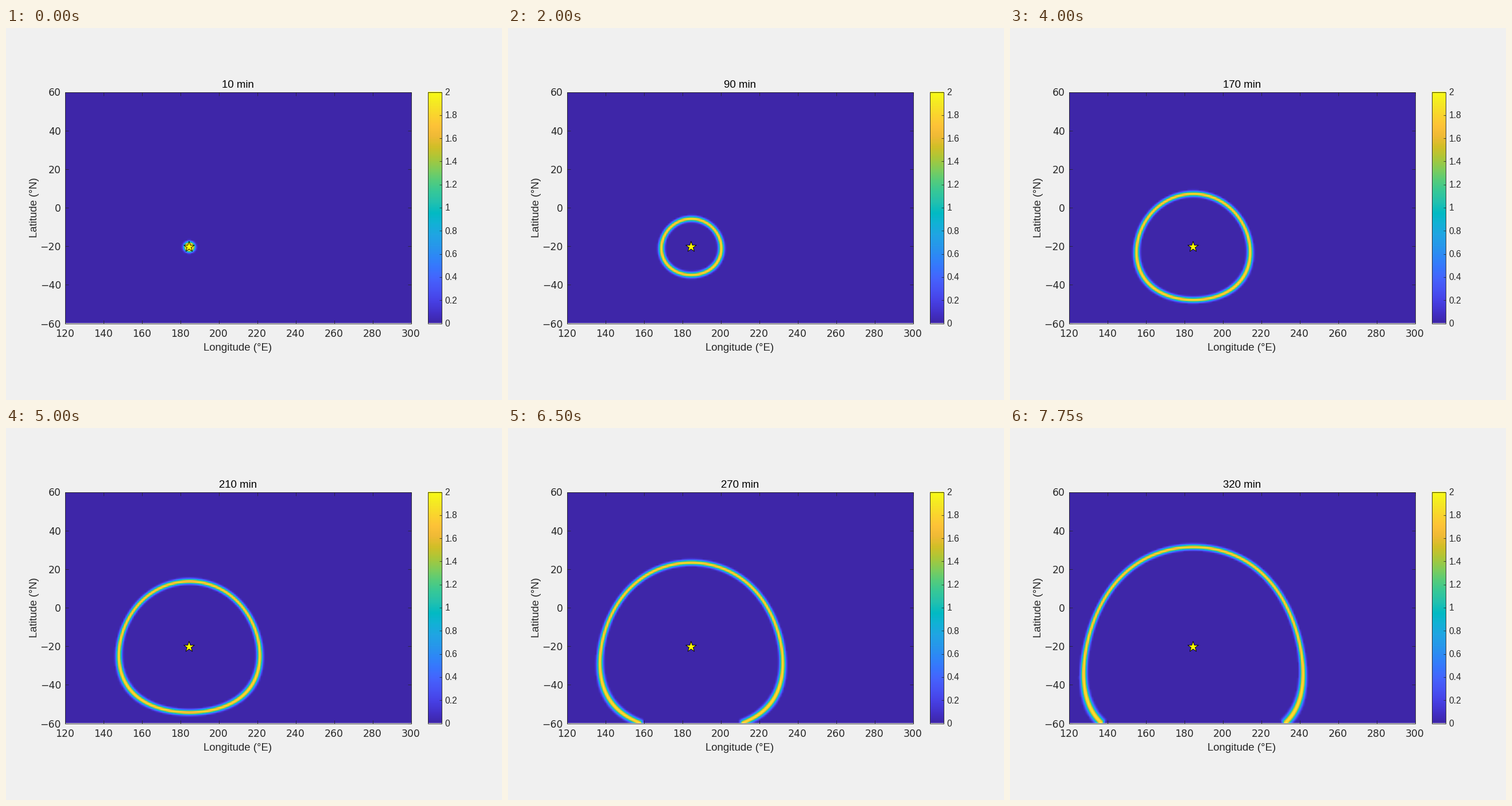
Recreate the animation shown at these times as a matplotlib script. Size 864 by 648 pixels, loop 8000 ms.

```python
import numpy as np
import matplotlib.pyplot as plt
from matplotlib.animation import FuncAnimation
from matplotlib.colors import LinearSegmentedColormap
from matplotlib.patches import Polygon, Rectangle

W, H, DPI = 864, 648, 72          # at 72 dpi one point is one pixel
FRAMES, INTERVAL = 32, 250
LEFT, RIGHT, TOP, BOTTOM = 102.5, 705.5, 111.5, 514.5
BAR_LEFT, BAR_RIGHT = 734.5, 758.5
INK = "#262626"

LON0, LAT0 = 184.61, -20.5
DEG_PER_MIN = 0.300 * 60 / 111.195  # 300 m/s along a great circle
SIGMA, REACH, PEAK = 0.8, 2.1, 2.0
EDGE = -60

SHADES = ("3E26A8 4332CB 4741E5 4852F4 4563FD 3875FE 2E87F7 2797EB 20A5E3 "
          "12B1D6 02BAC3 24C1AE 37C897 57CC7A 81CC59 ABC739 D1BF27 F0BA36 "
          "FEC338 FAD62D F5E924 F9FB15").split()
CMAP = LinearSegmentedColormap.from_list("wave", ["#" + s for s in SHADES])

lon, lat = np.meshgrid(np.arange(120, 301), np.arange(60, -61, -1))
dlon = np.abs(lon - LON0)
SIN0, COS0 = np.sin(np.radians(LAT0)), np.cos(np.radians(LAT0))
phi = np.radians(lat)
dist = np.degrees(np.arccos(np.clip(
    SIN0 * np.sin(phi) + COS0 * np.cos(phi) * np.cos(np.radians(dlon)), -1, 1)))


def end_fade(radius):
    """Cut the front square to its path where it leaves the map."""
    if radius <= LAT0 - EDGE:
        return 1.0
    r, p = np.radians(radius), np.radians(EDGE)
    cos_d = (np.cos(r) - SIN0 * np.sin(p)) / (COS0 * np.cos(p))
    d = np.arccos(cos_d)
    gx = np.cos(p) * COS0 * np.sin(d)
    gy = np.cos(p) * SIN0 - np.sin(p) * COS0 * cos_d
    past = (gy * (np.degrees(d) - dlon) - gx * (lat - EDGE)) / np.hypot(gx, gy)
    # only the southern end is cut, not the rest of the ring
    past = np.where(lat < EDGE + 6, np.maximum(past, 0), 0)
    return np.exp(-0.5 * (past / 0.5) ** 2)


def wave(minutes):
    radius = minutes * DEG_PER_MIN
    off = dist - radius
    height = PEAK * np.exp(-0.5 * (off / SIGMA) ** 2)
    return np.where(np.abs(off) < REACH, height, 0) * end_fade(radius)


def px(lon_deg):
    return LEFT + (lon_deg - 120) / 180 * (RIGHT - LEFT)


def py(lat_deg):
    return TOP + (60 - lat_deg) / 120 * (BOTTOM - TOP)


fig = plt.figure(figsize=(W / DPI, H / DPI), dpi=DPI, facecolor="#f0f0f0")
ax = fig.add_axes([0, 0, 1, 1])
ax.axis("off")


def label(x, y, text, size, font="Liberation Sans", color=INK, ha="center", **kw):
    return ax.text(x, y, text, fontsize=size, family=font, color=color,
                   ha=ha, va="baseline", **kw)


def line(x0, y0, x1, y1):
    ax.plot([x0, x1], [y0, y1], color=INK, lw=0.8, zorder=3,
            solid_capstyle="butt")


def frame(x0, x1):
    ax.add_patch(Rectangle((x0, TOP), x1 - x0, BOTTOM - TOP, fill=False,
                           edgecolor=INK, lw=0.9, zorder=3))


# Map: grid nodes sit on whole degrees, so the image overhangs by half a cell
hx, hy = (RIGHT - LEFT) / 360, (BOTTOM - TOP) / 240
field = ax.imshow(wave(10), cmap=CMAP, vmin=0, vmax=PEAK, aspect="auto",
                  interpolation="bilinear", interpolation_stage="data",
                  extent=(LEFT - hx, RIGHT + hx, BOTTOM + hy, TOP - hy))
field.set_clip_path(Rectangle((LEFT, TOP), RIGHT - LEFT, BOTTOM - TOP,
                              transform=ax.transData))
frame(LEFT, RIGHT)

TICK = 6
for v in range(120, 301, 20):
    x = px(v)
    line(x, TOP, x, TOP + TICK)
    line(x, BOTTOM, x, BOTTOM - TICK)
    label(x, 538, str(v), 17.3, "DejaVu Sans")
for v in range(-60, 61, 20):
    y = py(v)
    line(LEFT, y, LEFT + TICK, y)
    line(RIGHT, y, RIGHT - TICK, y)
    label(96, y + 7, str(v).replace("-", "\u2212"), 17.3, "DejaVu Sans", ha="right")

label(404, 561.5, "Longitude (°E)", 18.6)
label(54.5, 313, "Latitude (°N)", 18.6, rotation=90, rotation_mode="anchor")
title = label(404.3, 104.3, "", 18.6, color="black")

# Colour bar
ax.imshow(np.linspace(PEAK, 0, 256)[:, None], cmap=CMAP, vmin=0, vmax=PEAK,
          aspect="auto", interpolation="nearest",
          extent=(BAR_LEFT, BAR_RIGHT, BOTTOM, TOP))
frame(BAR_LEFT, BAR_RIGHT)
for k in range(11):
    y = BOTTOM - k / 10 * (BOTTOM - TOP)
    line(BAR_RIGHT - 4, y, BAR_RIGHT, y)
    label(764.5, y + 5.5, f"{k / 5:g}", 15.6, ha="left")

# Five-pointed star at the centre of the ring
ang = np.arange(10) * np.pi / 5
rad = np.where(np.arange(10) % 2, 0.382, 1) * 9.8
star = np.c_[px(LON0) + rad * np.sin(ang), 381.3 - rad * np.cos(ang)]
ax.add_patch(Polygon(star, facecolor="yellow", edgecolor="black", lw=0.9,
                     joinstyle="miter", zorder=4))

ax.set_xlim(0, W)
ax.set_ylim(H, 0)


def update(i):
    minutes = 10 * (i + 1)
    field.set_data(wave(minutes))
    title.set_text(f"{minutes} min")
    return field, title


anim = FuncAnimation(fig, update, frames=FRAMES, interval=INTERVAL,
                     init_func=lambda: update(0), repeat=True, repeat_delay=0)
plt.show()
```
